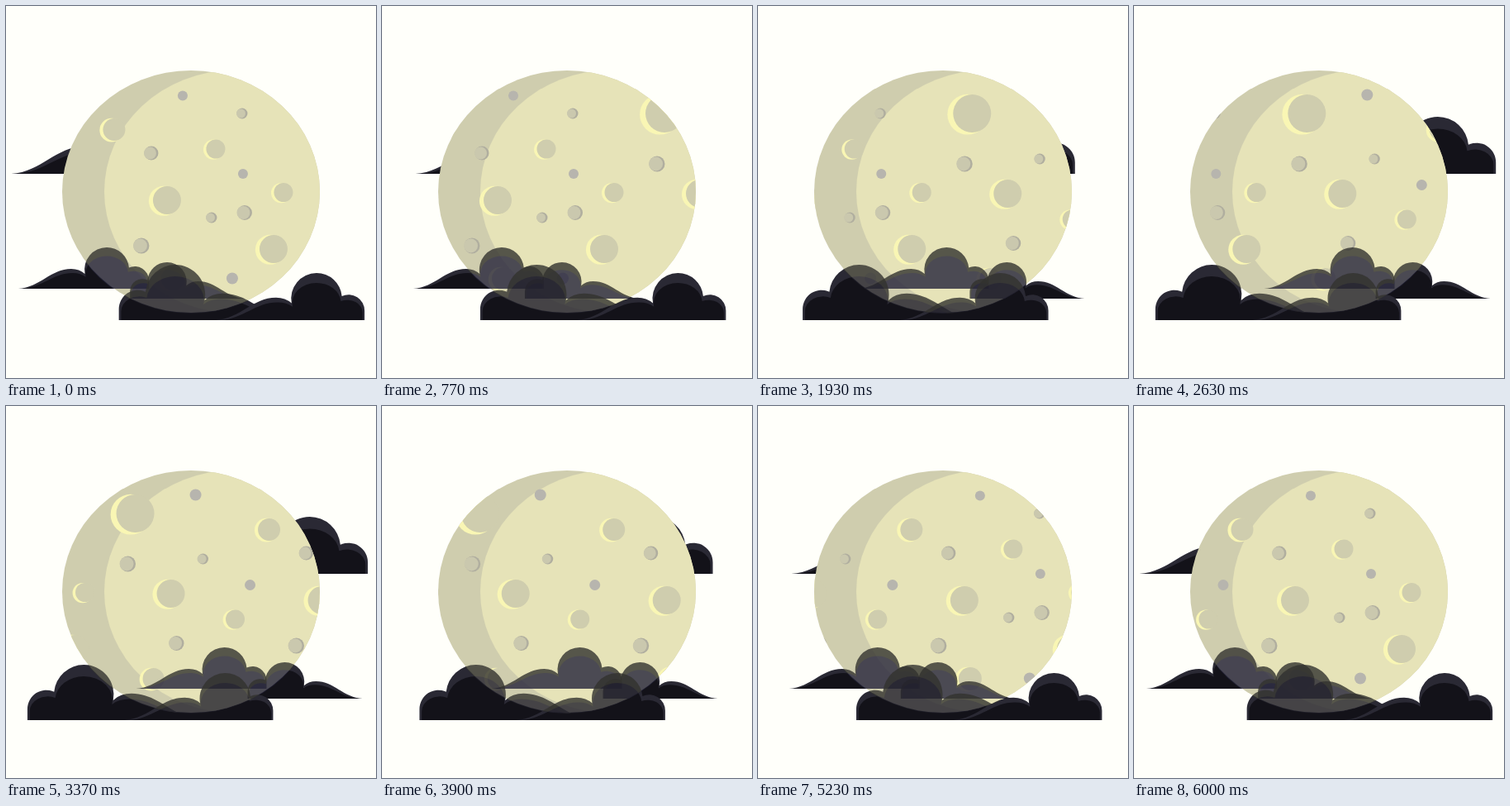
Write an HTML page that moves like this. It is 448 px wide and 450 px high and loops after 6030 ms.

```html
<!DOCTYPE html>
<html lang="en">
<head>
<meta charset="utf-8">
<title>Moon and clouds</title>
<style>
  html, body { margin: 0; width: 100%; height: 100%; overflow: hidden; background: #fffffa; }
  svg { display: block; width: 100vw; height: 100vh; }
</style>
</head>
<body>
<svg viewBox="0 0 448 450" preserveAspectRatio="none">
  <defs>
    <ellipse id="disc" cx="224" cy="224.5" rx="156" ry="146.5"/>
    <clipPath id="moonClip"><use href="#disc"/></clipPath>
    <!-- slightly larger, so no bright seam shows where clouds cross the edge -->
    <clipPath id="glowClip"><ellipse cx="224" cy="224.5" rx="156.8" ry="147.3"/></clipPath>
    <path id="puff" d="M-107 0C-80-2-68-24-43-24Q-33-24-26.500-18A27 27 0 0 1 0-50A27 27 0 0 1 26.900-25.500A17 17 0 0 1 51-10V0Z"/>
  </defs>
  <g id="back"></g>
  <use href="#disc" fill="#cfcdae"/>
  <g clip-path="url(#moonClip)">
    <ellipse cx="275" cy="224.5" rx="156" ry="146.5" fill="#e6e3b8"/>
    <g id="craters"></g>
  </g>
  <g id="front" clip-path="url(#glowClip)"></g>
</svg>
<script>
const NS = 'http://www.w3.org/2000/svg';
const LOOP = 6030, CYCLE = 6000, STRIP = 428;
const byId = id => document.getElementById(id);

function add(parent, tag, attrs) {
  const el = document.createElementNS(NS, tag);
  for (const key in attrs) el.setAttribute(key, attrs[key]);
  return parent.appendChild(el);
}

const circle = (cx, cy, r, fill) => add(byId('craters'), 'circle', { cx, cy, r, fill });

const drawCrater = {
  rim(x, y, r) {
    circle(x - r * 0.24, y + r * 0.05, r * 1.06, '#f9f6b4');
    circle(x, y, r, '#cfcdae');
  },
  pit(x, y, r) {
    circle(x, y, r, '#b0ae9f');
    circle(x - 1.5, y, r - 1, '#cac8ae');
  },
  dot(x, y, r) { circle(x, y, r, '#b7b5ae'); }
};

// kind, x, y, radius
const repeated = [
  ['dot', 214, 108.5, 6], ['pit', 286, 130, 6.5], ['rim', 254, 173, 11.5],
  ['pit', 176, 178, 8.5], ['rim', 131, 149.5, 13.5], ['dot', 287, 203, 6],
  ['rim', 195, 235, 17], ['rim', 336, 225.5, 11.5], ['pit', 249, 256, 6.5],
  ['pit', 289, 250, 9], ['pit', 164, 290, 9.5], ['rim', 324, 294, 17],
  ['dot', 274, 329.5, 7], ['rim', 202, 330, 14]
];
const single = [
  ['rim', 397, 130, 23], ['pit', 388, 191, 9.5], ['rim', 440, 227, 17],
  ['pit', 479, 185, 6.5], ['pit', 447, 287, 9], ['dot', 470, 107.5, 7],
  ['dot', 536, 216.5, 6.5], ['rim', 518, 258, 11.5], ['rim', 419, 330, 13]
];
for (const [kind, x, y, r] of repeated) {
  drawCrater[kind](x, y, r);
  drawCrater[kind](x + STRIP, y, r);
}
for (const [kind, x, y, r] of single) drawCrater[kind](x, y, r);

function addCloud(layer, outer, inner, opacity) {
  const g = add(layer, 'g', { opacity });
  add(g, 'use', { href: '#puff', fill: outer });
  add(g, 'use', { href: '#puff', fill: inner, transform: 'scale(.96 .79)' });
  return g;
}

// start x, base y, travel, scale, facing, colour seen through the moonlight
const clouds = [
  { x: 154, y: 203, travel: 222, size: 1.38, face: 1 },
  { x: 122, y: 342, travel: 148, size: 1, face: 1, tint: '#25243a' },
  { x: 195, y: 354, travel: 148, size: 0.88, face: -1, tint: '#25243a' },
  { x: 205, y: 380, travel: -115, size: 1.34, face: -1, tint: '#22212c' },
  { x: 376, y: 380, travel: -115, size: 1.14, face: 1, tint: '#22212c' }
];
for (const c of clouds) {
  c.parts = [addCloud(byId('back'), '#2a2934', '#131219', 1)];
  if (c.tint) c.parts.push(addCloud(byId('front'), '#33322f', c.tint, 0.8));
}

function render(ms) {
  const t = Math.min(ms % LOOP, CYCLE) / CYCLE;
  const sway = (1 - Math.cos(2 * Math.PI * t)) / 2;
  byId('craters').setAttribute('transform', `translate(${-STRIP * t} 0)`);
  for (const c of clouds) {
    const place = `translate(${c.x + c.travel * sway} ${c.y}) scale(${c.face * c.size} ${c.size})`;
    for (const part of c.parts) part.setAttribute('transform', place);
  }
}

const start = performance.now();
function tick() {
  render(performance.now() - start);
  requestAnimationFrame(tick);
}
tick();
</script>
</body>
</html>
```
